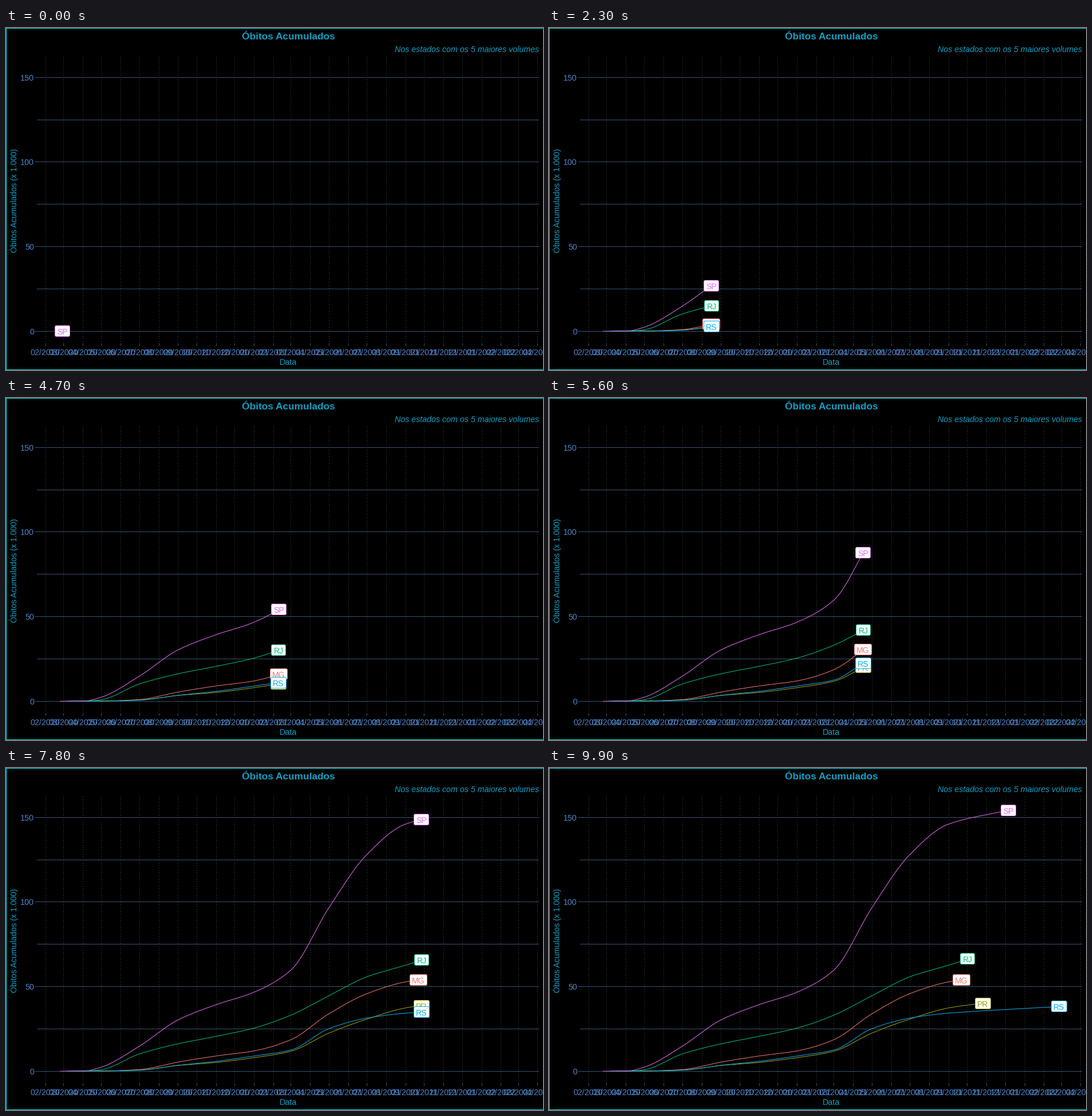
A matplotlib script that plays this animation: 938x597 px, repeating every 10000 ms.

```python
import numpy as np
import matplotlib.pyplot as plt
from matplotlib.animation import FuncAnimation
from matplotlib.patches import FancyBboxPatch

W, H, DPI = 938, 597, 64
PX = 72 / DPI  # points per pixel
FRAMES, INTERVAL = 100, 100

GRID = "#36526A"
TITLE = "#12A0C6"
TICK = "#4C82C6"
BORDER = "#00E5EE"

# Pixel scales: per day along x, per thousand deaths along y
X0, PER_DAY = 68.5, 1.0886
Y0, PER_K = 529.3, 2.954
HEAD0, HEAD_STEP = 98.6, 8.04
BOX_H = 19

# name: colour, first and last date, thousands every second month
# from 05/2020 and on the last date
STATES = {
    "MG": ("#F8766D", "2020-03-08", "2021-09-22",
           [.1, 1, 5.4, 9, 12, 18.6, 33.9, 45.8, 52.8, 53.9]),
    "PR": ("#A3A500", "2020-03-12", "2021-10-26",
           [.1, .7, 3.4, 5.2, 8, 11.8, 22.5, 30.8, 37.4, 40.2]),
    "RJ": ("#00BF7D", "2020-03-05", "2021-10-02",
           [.9, 10.2, 16.2, 20.6, 25.5, 33.1, 44.6, 55.8, 62.6, 66.3]),
    "RS": ("#00B0F6", "2020-03-10", "2022-02-26",
           [.1, .6, 3.5, 5.8, 9, 12.5, 25.1, 31.4, 34.3, 38.2]),
    "SP": ("#E76BF3", "2020-02-25", "2021-12-06",
           [2.4, 14.8, 30.3, 39.3, 46.7, 59.7, 96.5, 128, 146, 154.2]),
}


def date_x(dates):
    days = np.asarray(dates, dtype="datetime64[D]") - np.datetime64("2020-02-01")
    return X0 + PER_DAY * days.astype(float)


def month_range(start, stop, step=1):
    return np.arange(start, stop, step, dtype="datetime64[M]")


def count_y(thousands):
    return Y0 - PER_K * thousands


def monotone(x, xp, yp):
    """Smooth rising curve through the points (xp, yp)."""
    h = np.diff(xp)
    d = np.diff(yp) / h
    inner = 2 * d[:-1] * d[1:] / (d[:-1] + d[1:])
    m = np.concatenate([d[:1], inner, d[-1:]])
    k = np.clip(np.searchsorted(xp, x) - 1, 0, len(h) - 1)
    t = (x - xp[k]) / h[k]
    return (yp[k] + (yp[k + 1] - yp[k]) * t * t * (3 - 2 * t)
            + h[k] * t * (1 - t) * (m[k] * (1 - t) - m[k + 1] * t))


plt.rcParams["font.family"] = "Liberation Sans"
fig = plt.figure(figsize=(W / DPI, H / DPI), dpi=DPI, facecolor="black")
ax = fig.add_axes([0, 0, 1, 1])
ax.set_xlim(0, W)
ax.set_ylim(H, 0)
ax.axis("off")


def text(x, y, s, size, color, **kw):
    kw = {"ha": "center", "va": "baseline", **kw}
    return ax.text(x, y, s, fontsize=size * PX, color=color, **kw)


def rule(xs, ys, color=GRID, style="-"):
    ax.plot(xs, ys, color=color, lw=PX, ls=style, snap=False, zorder=1,
            solid_capstyle="butt", dash_capstyle="butt")


def draw_stage():
    for month in month_range("2020-02", "2022-05"):
        x = date_x(month)
        col = np.floor(x + .5) + .5
        rule([col, col], [50, 551], style=(0, (1, 3)))
        rule([col, col], [551, 555])
        year, number = str(month).split("-")
        text(x, 571, f"{number}/{year}", 14.4, TICK)
    for v in range(0, 151, 25):
        row = np.floor(count_y(v)) + .5
        major = v % 50 == 0
        rule([51 if major else 54, 931], [row, row])
        if major:
            text(49, row + 5.5, str(v), 14.4, TICK, ha="right")
    text(493, 20, "Óbitos Acumulados", 17.2, TITLE, weight="bold")
    text(931, 42, "Nos estados com os 5 maiores volumes", 14.3, TITLE,
         ha="right", style="italic")
    text(493, 588, "Data", 14.2, TITLE)
    text(22, 301.5, "Óbitos Acumulados (x 1.000)", 14.15, TITLE,
         rotation=90, ha="right", va="center")
    rule([W, .5, .5, W], [.5, .5, H - .5, H - .5], BORDER)


class Series:
    def __init__(self, name, order):
        color, first, last, counts = STATES[name]
        self.first, self.last = date_x(first), date_x(last)
        knots = date_x(month_range("2020-05", "2021-10", 2))
        self.xp = np.concatenate([[self.first, date_x("2020-04-01")], knots, [self.last]])
        self.yp = np.concatenate([[0, .02], counts])
        self.line, = ax.plot([], [], color=color, lw=PX, snap=False, zorder=3)
        z = 4 + order / 10
        self.label = text(0, 0, name, 14, color, zorder=z + .05)
        self.width = round(self.label.get_window_extent().width + 7.5)
        self.box = FancyBboxPatch(
            (0, 0), self.width, BOX_H, boxstyle="round,pad=0,rounding_size=2.5",
            fc="white", ec=color, lw=PX, zorder=z)
        ax.add_patch(self.box)

    def show(self, head):
        seen = head >= self.first
        for part in (self.line, self.box, self.label):
            part.set_visible(seen)
        if not seen:
            return
        x = min(head, self.last)
        xs = np.append(np.arange(self.first, x, PER_DAY), x)
        ys = count_y(monotone(xs, self.xp, self.yp))
        self.line.set_data(xs, ys)
        left = np.floor(x - self.width / 2) + .5
        top = np.floor(ys[-1] - BOX_H / 2) + .5
        self.box.set_bounds(left, top, self.width, BOX_H)
        self.label.set_position((left + self.width / 2, top + 15.5))


draw_stage()
series = [Series(name, i) for i, name in enumerate(STATES)]


def update(i):
    for s in series:
        s.show(HEAD0 + HEAD_STEP * i)
    return []


anim = FuncAnimation(fig, update, frames=FRAMES, interval=INTERVAL,
                     init_func=lambda: update(0), repeat=True, repeat_delay=0)
plt.show()
```
